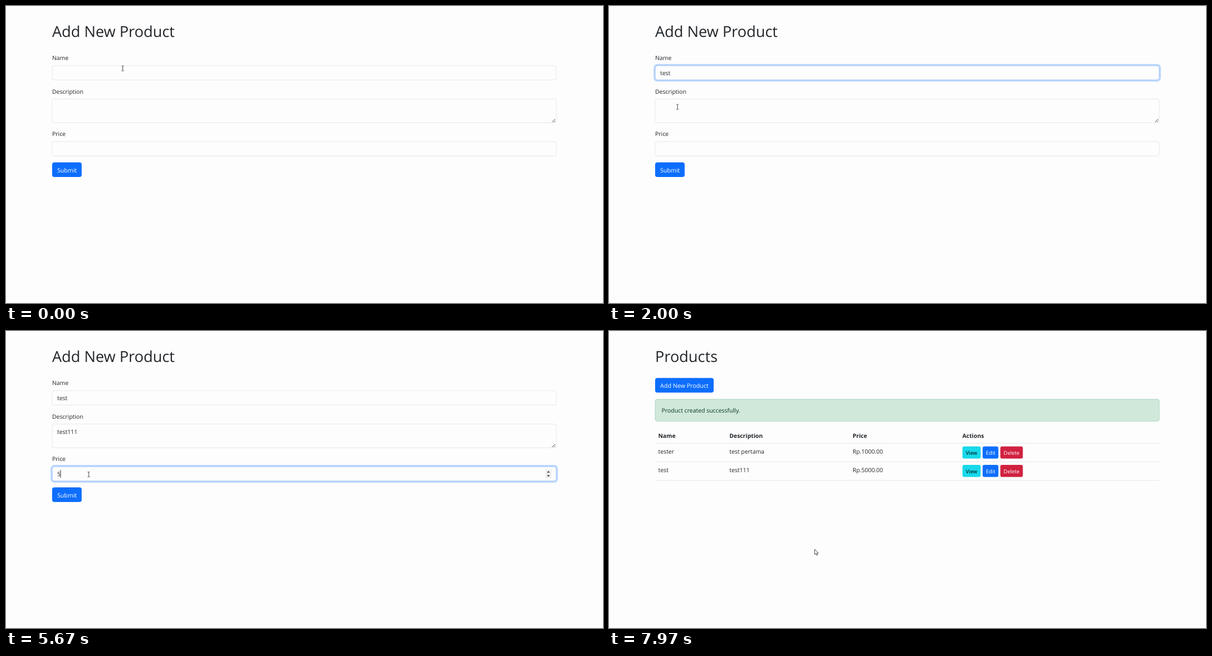
Animation, 1061 px wide and 528 px high, one loop 8000 ms. Source, as an HTML page:

```html
<!DOCTYPE html>
<html lang="en">
<head>
<meta charset="utf-8">
<title>Add New Product</title>
<style>
  html, body { margin: 0; width: 100%; height: 100%; overflow: hidden; background: #fdfdfd; }
  svg { display: block; width: 1061px; height: 528px; }
  text { font: 10.4px "Open Sans", "Noto Sans", sans-serif; fill: #212529; text-rendering: geometricPrecision; white-space: pre; }
  .title { font-size: 26.9px; font-weight: 500; }
  .bold { font-weight: 700; font-size: 10.3px; }
  .button { font-size: 10.6px; fill: #fff; }
  .small { font-size: 9.4px; fill: #fff; }
  .dark { fill: #000; }
  .alert { fill: #0a3622; }
  .hint { font-size: 7.8px; font-weight: 600; fill: #fff; }
</style>
</head>
<body>
<svg viewBox="0 0 1061 528">
  <g id="form"></g>
  <g id="list"></g>
  <g id="arrow"><path d="M0 0V9.4L2.2 7.4L3.7 10.8L5.2 10.1L3.7 6.9H6.6Z" fill="#fff" stroke="#222" stroke-width=".8"/></g>
  <g id="beam"><path d="M-2-4.3H-.5L0-3.8L.5-4.3H2M0-3.8V3.8M-2 4.3H-.5L0 3.8L.5 4.3H2" fill="none" stroke="#333" stroke-width=".9"/></g>
  <g id="hand"><path d="M-1 .5Q0-1 1 .5V4L4.6 5Q5.6 5.4 5.4 6.6L4.4 11H-1.2L-4 7Q-4.2 5.6-3 5.8L-1 7.2Z" fill="#fff" stroke="#222" stroke-width=".8"/></g>
</svg>
<script>
const LOOP = 8000, LEFT = 82, WIDTH = 896;
const PAGE_CHANGE = 7560, HOVER = 6960;
const $ = id => document.getElementById(id);
const clamp = v => Math.min(1, Math.max(0, v));
const smooth = v => v * v * (3 - 2 * v);
const ramp = (t, start, length = 150) => smooth(clamp((t - start) / length));
const show = (el, on) => el.setAttribute("visibility", on ? "inherit" : "hidden");

const text = (x, y, s, cls = "") => `<text x="${x}" y="${y}" class="${cls}">${s}</text>`;
const box = (x, y, w, h, r, attrs) =>
  `<rect x="${x}" y="${y}" width="${w}" height="${h}" rx="${r}" ${attrs}/>`;
const button = (x, y, w, h, fill, label, pad, base, cls) =>
  box(x, y, w, h, h > 24 ? 4 : 3, `fill="${fill}"`) + text(x + pad, y + base, label, cls);

// Each field: frame, text baseline, focus span and the time of every key press
const fields = [
  { label: "Name", y: 106, h: 25.5, base: 123.2, from: 400, to: 2090, value: "test", keys: [900, 1020, 1110, 1230] },
  { label: "Description", y: 165.4, h: 42.2, base: 182.7, from: 2090, to: 5130, value: "test111",
    keys: [3450, 3570, 3680, 3780, 4000, 4110, 4220] },
  { label: "Price", y: 241, h: 25.8, base: 258.3, from: 5130, to: LOOP, value: "5000", keys: [5500, 5950, 6080, 6210] }
];

// Pointer moves: start, end, destination
const home = [207.5, 111];
const moves = [
  [520, 820, 215, 133],
  [1730, 2060, 113, 183.5],
  [4480, 5040, 147, 255],
  [6740, 7100, 113, 290.5],
  [7590, 7970, 365.5, 388]
];

const fieldMarkup = (f, i) =>
  text(LEFT, f.y - 9.7, f.label) +
  box(LEFT, f.y, WIDTH, f.h, 4, 'fill="#fdfdfd" stroke="#dee2e6" stroke-width=".8"') +
  `<g id="ring${i}">` +
  box(LEFT - 1.5, f.y - 1.5, WIDTH + 3, f.h + 3, 5, 'fill="none" stroke="#c2dbfe" stroke-width="2.8"') +
  box(LEFT, f.y, WIDTH, f.h, 4, 'fill="none" stroke="#86b7fe" stroke-width=".8"') + "</g>" +
  `<text id="value${i}" x="91" y="${f.base}"></text>` +
  `<path id="caret${i}" d="M0 ${f.base - 11.4}v14" stroke="#212529" stroke-width=".9"/>`;

$("form").innerHTML =
  text(LEFT, 55.4, "Add New Product", "title") +
  fields.map(fieldMarkup).join("") +
  '<path d="M970.5 206.5l5.5-5.5M974 206.5l2-2" stroke="#444" stroke-width="1"/>' +
  `<g id="spinner">${box(958.5, 246, 11, 16, 1, 'fill="#efefef"')}` +
  '<path d="M961.3 251.7l2.7-3 2.7 3zM961.3 256.3l2.7 3 2.7-3z" fill="#444"/></g>' +
  box(LEFT, 278, 52.5, 26, 4, 'fill="#0d6efd"') +
  box(LEFT, 278, 52.5, 26, 4, 'id="hover" fill="#000"') +
  text(91, 295.8, "Submit", "button") +
  `<g id="hint" style="filter:drop-shadow(0 1px 1.5px #0006)">` +
  box(150, 137.5, 107.7, 30, 4, 'fill="#1f1f1f"') +
  '<path d="M159 138l6-5.6 6 5.6z" fill="#1f1f1f"/>' + text(158, 155.8, "tester", "hint") + "</g>";

const row = (y, name, description, price) =>
  text(87.5, y, name) + text(214, y, description) + text(433, y, price) +
  button(628.2, y - 13, 32.3, 21.5, "#17d9ea", "View", 5.8, 14.6, "small dark") +
  button(664, y - 13, 28, 21.5, "#0d6efd", "Edit", 5.8, 14.6, "small") +
  button(695.5, y - 13, 40, 21.5, "#d0213f", "Delete", 5.8, 14.6, "small");
const columns = [[87.5, "Name"], [214, "Description"], [433, "Price"], [628, "Actions"]];

$("list").innerHTML =
  text(LEFT, 55.4, "Products", "title") +
  button(LEFT, 83.5, 104, 26, "#0d6efd", "Add New Product", 9, 17.8, "button") +
  box(LEFT, 121.3, WIDTH, 39, 4, 'fill="#d0e8da" stroke="#a3cfbb" stroke-width=".8"') +
  text(93.5, 145, "Product created successfully.", "alert") +
  columns.map(([x, s]) => text(x, 189.8, s, "bold")).join("") +
  row(218.3, "tester", "test pertama", "Rp.1000.00") +
  row(251, "test", "test111", "Rp.5000.00") +
  '<path d="M82 199.5h896M82 232.5h896M82 265.5h896" stroke="#dee2e6" stroke-width=".8"/>';

function pointer(t) {
  let [x, y] = home;
  for (const [start, end, toX, toY] of moves) {
    const k = ramp(t, start, end - start);
    x += (toX - x) * k;
    y += (toY - y) * k;
  }
  return [x, y];
}

function drawField(f, i, t) {
  const typed = f.keys.filter(k => k <= t);
  const focused = t >= f.from && t < f.to;
  const value = $("value" + i), caret = $("caret" + i);
  const since = typed.length ? typed[typed.length - 1] : f.from;
  value.textContent = f.value.slice(0, typed.length);
  const end = typed.length ? value.getComputedTextLength() : 0;
  caret.setAttribute("transform", `translate(${91 + end})`);
  show(caret, focused && Math.floor((t - since) / 500) % 2 === 0);
  $("ring" + i).setAttribute("opacity", ramp(t, f.from) - ramp(t, f.to));
}

function draw(t) {
  const listed = t >= PAGE_CHANGE;
  show($("form"), !listed);
  show($("list"), listed);
  fields.forEach((f, i) => drawField(f, i, t));
  show($("spinner"), t >= 4990);
  show($("hint"), t >= 960 && t < 1700);
  $("hover").setAttribute("opacity", 0.14 * ramp(t, HOVER));

  const [x, y] = pointer(t);
  const overField = !listed && fields.some(f => y > f.y && y < f.y + f.h);
  const overButton = !listed && t > HOVER;
  const kind = overButton ? "hand" : overField ? "beam" : "arrow";
  for (const id of ["arrow", "beam", "hand"]) {
    show($(id), id === kind);
    $(id).setAttribute("transform", `translate(${x} ${y})`);
  }
}

function tick(now) {
  draw(now % LOOP);
  requestAnimationFrame(tick);
}
draw(0);
requestAnimationFrame(tick);
</script>
</body>
</html>
```
